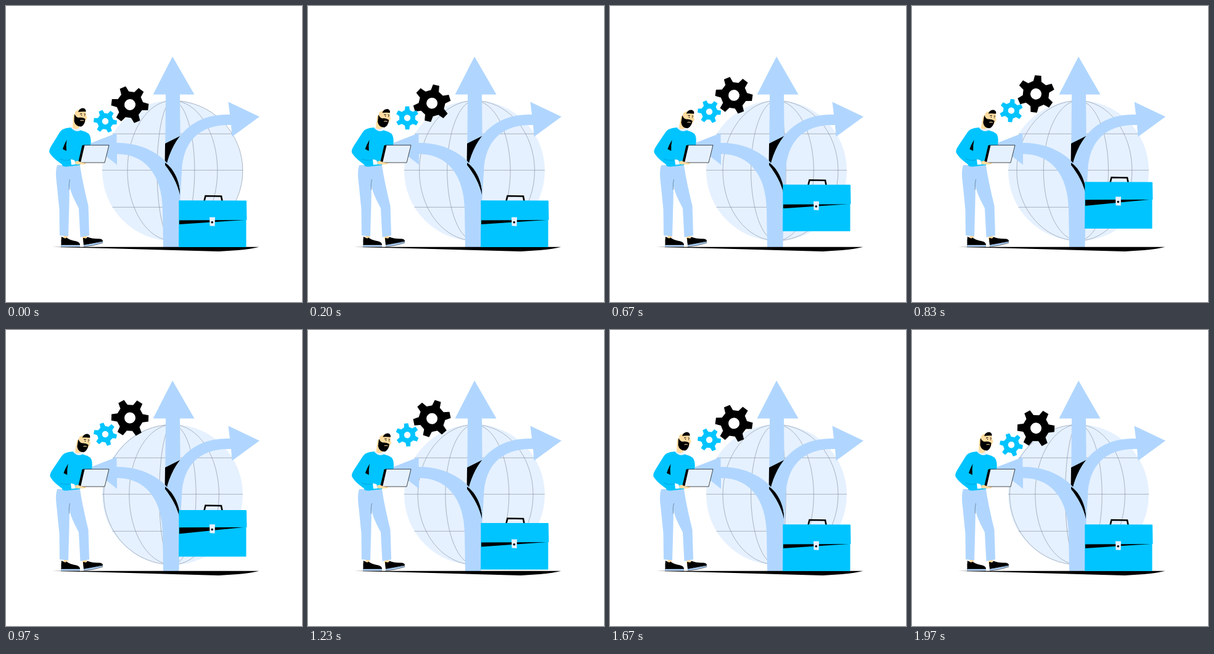
These frames come from a looping animation (480x480 px, 2 s). An HTML page with a canvas:

```html
<!DOCTYPE html>
<html lang="en">
<head>
<meta charset="utf-8">
<title>Choosing a direction</title>
<style>
html, body { margin: 0; width: 100%; height: 100%; overflow: hidden; background: #fff; }
canvas { display: block; width: 480px; height: 480px; }
</style>
</head>
<body>
<canvas id="stage"></canvas>
<script>
const LOOP = 2000;
const BLACK = '#000', WHITE = '#fff', CYAN = '#00c4ff', SKY = '#b0d6ff', PALE = '#e6f1ff', SKIN = '#ffdc9f';
const canvas = document.getElementById('stage');
const ctx = canvas.getContext('2d');
const ratio = window.devicePixelRatio || 1;
canvas.width = canvas.height = 480 * ratio;

const ease = (t, a, b) => {
  const p = Math.min(1, Math.max(0, (t - a) / (b - a)));
  return p * p * (3 - 2 * p);
};
const hump = (t, a, b, c, d) => ease(t, a, b) - ease(t, c, d);

function fill(d, color) {
  ctx.fillStyle = color;
  ctx.fill(new Path2D(d), 'evenodd');
}

function stroke(d, color, width) {
  ctx.strokeStyle = color;
  ctx.lineWidth = width;
  ctx.stroke(new Path2D(d));
}

function disc(x, y, r, color) {
  ctx.fillStyle = color;
  ctx.beginPath();
  ctx.arc(x, y, r, 0, Math.PI * 2);
  ctx.fill();
}

function globe(t) {
  const cx = 270, cy = 267, r = 114;
  const stops = [384, 343, 306, 245, 197, 156];
  const phase = t % 500 / 500;
  disc(cx, cy, r, PALE);
  ctx.strokeStyle = '#8b98aa';
  ctx.lineWidth = 0.7;
  for (const y of [207, 266, 326]) {
    const half = Math.sqrt(r * r - (y - cy) ** 2);
    ctx.beginPath();
    ctx.moveTo(cx - half, y + 0.3);
    ctx.lineTo(cx + half, y + 0.3);
    ctx.stroke();
  }
  for (let i = 0; i < stops.length - 1; i++) {
    const dx = stops[i] + (stops[i + 1] - stops[i]) * phase - cx;
    ctx.beginPath();
    ctx.ellipse(cx, cy, Math.abs(dx), r - 0.4, 0, -Math.PI / 2, Math.PI / 2, dx < 0);
    ctx.stroke();
  }
}

function arrows() {
  // up
  fill('M270 82L305.500 143.500H282L283 262H258L259 143.500H238.500Z', SKY);
  fill('M258 223L283 210.500Q276 238 262 261L257.500 258Z', BLACK);
  // right
  fill('M260 259C271 212 303 174 363 176L360.500 155.500L411 179.500L366.500 212L365 193C318 191 286 216 285 270L282 320Z', SKY);
  fill('M257.500 256Q283 276 282 308Q277 278 257.500 256Z', BLACK);
  // left, with the shared trunk
  fill('M136 223L179.500 206V222C224 221 280 247 282 307L280.500 391H255L254 330C253 274 226 240 180 240V257.500Z', SKY);
  fill('M258 254C270 262 282 281 282 306C278 288 269 272 258 258Z', BLACK);
}

function gear(x, y, outer, root, hole, deg, color) {
  const step = Math.PI / 3;
  ctx.save();
  ctx.translate(x, y);
  ctx.rotate(deg * Math.PI / 180);
  ctx.beginPath();
  for (let i = 0; i < 6; i++) {
    const a = i * step;
    for (const [off, r] of [[-0.31, root], [-0.17, outer], [0.17, outer], [0.31, root]]) {
      ctx.lineTo(Math.cos(a + off) * r, Math.sin(a + off) * r);
    }
  }
  ctx.closePath();
  ctx.moveTo(hole, 0);
  ctx.arc(0, 0, hole, 0, Math.PI * 2);
  ctx.fillStyle = color;
  ctx.fill('evenodd');
  ctx.restore();
}

function gears(t) {
  const wave = Math.sin(Math.PI * t / LOOP);
  const rise = t < 1000 ? ease(t, 0, 870) : wave;
  const turn = 360 * t / LOOP;
  gear(201, 160 - 17.5 * rise, 30.5, 21.5, 9, 7 + turn, BLACK);
  gear(161, 187 - 18 * wave, 19, 13.2, 5.2, 6 - turn, CYAN);
}

function briefcase(t) {
  const jump = 30 * hump(t, 520, 718, 820, 1320);
  const lift = 4.2 * hump(t, 680, 900, 900, 1320);
  ctx.save();
  ctx.translate(0, -jump);
  stroke('M321.500 316L323.500 308L349 308.500L350.500 316', BLACK, 2.6);
  fill('M280.500 315.500H389.500V391H280Z', CYAN);
  fill(`M281 ${347 - lift}H387L281 354Z`, BLACK);
  fill(`M280.500 315.500L390 316L390.500 ${347 - lift}L281 ${347.5 - lift}Z`, CYAN);
  ctx.translate(0, -lift);
  fill('M330 342.500H339L338.500 357L330.500 356.500Z', PALE);
  disc(334.3, 350.8, 1.8, BLACK);
  ctx.restore();
}

function legs() {
  fill('M94 370H101L99 379H93ZM124 370H132L130 379H124Z', SKIN);
  fill('M83 258C80 268 81 277 82.500 290L86.500 330L87 372L101 373.500L102.500 320L103 292C105 304 113 318 118 328L120.500 375L135 372L133.500 324C129 305 123 280 120 258Z', SKY);
  stroke('M103.500 281Q101.500 288 102.500 298', '#57718f', 0.7);
  // shoes
  fill('M90 374Q89 380 89.500 387.500H120Q120 383 114 381.500Q104 380 98 375.500L96 377Z', BLACK);
  fill('M89 387.500H120V390.500H89Z', SKY);
  stroke('M89 387.500H120M89 390.700H120', BLACK, 0.6);
  fill('M125 376Q125 382 126 387.500L157 382Q157.500 378 152 377.500Q140 378 132 374.500L130 377Z', BLACK);
  fill('M125.500 387.500L157 381.500L157.500 383.500Q142 389 125.500 390Z', SKY);
  stroke('M126 387.500L157 382M126 390.300Q142 389 157 384', BLACK, 0.6);
}

function head(lean) {
  ctx.save();
  ctx.translate(114 + lean * 0.6, 194 + lean * 2.2);
  ctx.rotate(lean * 0.07);
  ctx.translate(-114, -194);
  fill('M109 176L108 198Q114 203 119 197L119 184Z', SKIN);
  fill('M112 172Q117 166 127 168Q130 171 129.500 175L131.500 181L128 189Q118 192 111 183Z', SKIN);
  fill('M117 172Q119 165.500 125 165.500Q130 166.500 129.500 171.500Q123 171 117 172Z', BLACK);
  fill('M111 175Q114 181 118 181Q124 180 128.500 183Q128 193 122 195.500Q113 196 110.500 187Z', BLACK);
  stroke('M120 175L123.500 174.700M126.500 175L129 175.500', BLACK, 1);
  disc(122.5, 177.4, 0.7, BLACK);
  disc(127.6, 177.7, 0.7, BLACK);
  stroke('M120.500 186Q123 184.700 126 186', SKIN, 1);
  ctx.restore();
}

function man(t) {
  const lean = hump(t, 0, 400, 1050, 1500);
  const k = lean * 0.055;
  legs();
  ctx.save();
  // shear the torso around the waist
  ctx.transform(1, 0, -k, 1, k * 257, 0);
  head(lean);
  fill('M106 195.500Q113 203 119 197.500L121.500 203L115 207L105 201Z', PALE);
  fill('M105 197C96 198 91 199 87 205L74 226C70 233 69 236 72 240C77 247 84 252 91 257Q91 261 99 260.500L120 258L129 240L137.500 225Q138.500 212 134 207Q128 203 121 201.500Q113 206 105 197Z', CYAN);
  fill('M98.500 217Q94 225 92 232L98 235Q97 226 98.500 217Z', BLACK);
  stroke('M87 248Q97 252 105 249', '#008fc7', 0.6);
  ctx.restore();
  fill('M105 248.500L111 250L113 257L106 257.500Z', WHITE);
  fill('M112 252L120 250.500L130 254L128 256.500L113 256.500Z', SKIN);
}

function laptop() {
  fill('M123.500 226H128L121.500 254L117.500 252Z', BLACK);
  fill('M127.500 226H167L160 254H121Z', PALE);
  stroke('M125 225.700H167L160 254H120', BLACK, 0.7);
  fill('M113 253.500L118 252L127 255L129 256.500L115 257Z', SKIN);
}

function draw(t) {
  ctx.setTransform(ratio, 0, 0, ratio, 0, 0);
  ctx.fillStyle = WHITE;
  ctx.fillRect(0, 0, 480, 480);
  globe(t);
  arrows();
  gears(t);
  fill('M75 390.700H410.500Q398 394 376 396L345 398L290 396.500L165 393Z', BLACK);
  briefcase(t);
  man(t);
  laptop();
}

const start = performance.now();
function tick() {
  draw((performance.now() - start) % LOOP);
  requestAnimationFrame(tick);
}
tick();
</script>
</body>
</html>
```
